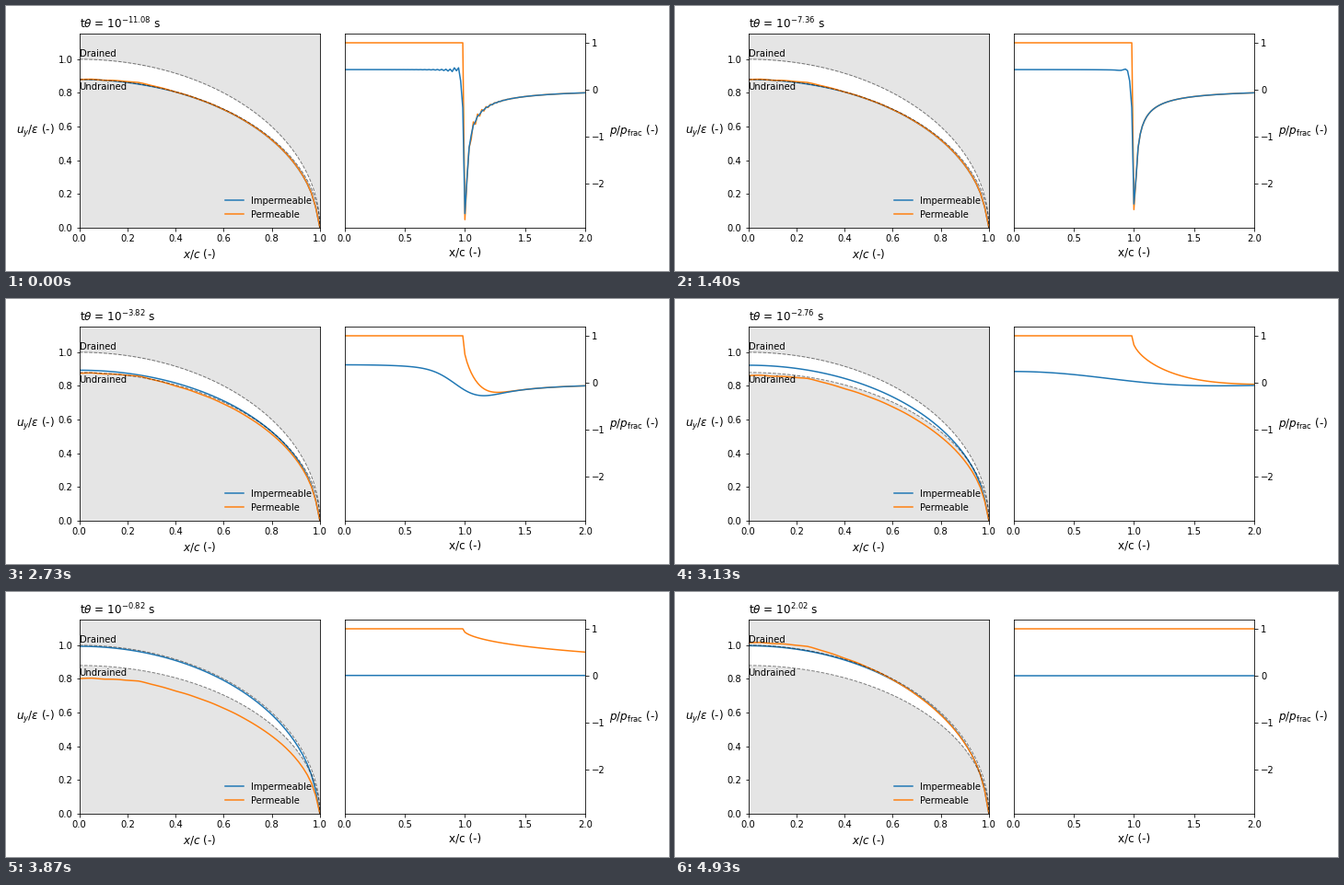
A matplotlib script for the animation above (4990 ms loop, 720 by 288 pixels).

```python
import math

import numpy as np
import matplotlib.pyplot as plt
from matplotlib.animation import FuncAnimation

W, H = 720, 288
FRAMES, LOOP = 75, 4990
E0, DE = -11.08, 0.17697      # log10 of time: start and step
K = 0.43                      # undrained crack pressure
UNDRAINED, DRAINED = 0.88, 0.997
BLUE, ORANGE = "C0", "C1"
NT = 57                       # mesh intervals along the crack

erfc = np.vectorize(math.erfc, otypes=[float])

# Spectral form of the crack pressure: Bessel J1 on a wavenumber grid
dk = 0.1
k = dk * np.arange(1, 9001)
theta = (np.arange(500) + 0.5) * np.pi / 500
j1 = np.cos(theta - np.outer(k, np.sin(theta))).mean(axis=1)

# Nodes along the crack line, counted from the tip
node = np.arange(2 * NT + 1) - NT
xp = (node + NT) / NT
modes = np.cos(np.outer(xp, k)) * j1 * dk
ahead = np.arccosh(1 + np.maximum(xp - 1 + 1 / NT, 0)) ** 2 / 2
phi = (np.arange(80) + 0.5) * np.pi / 160
sign = (-1.0) ** node

# The meshed crack is slightly shorter than the exact ellipse
xs = np.sin(np.linspace(0, np.pi / 2, 160))
ellipse = np.sqrt(np.maximum(1 - xs ** 2, 0))
xu = xp[:NT + 1]
crack = np.sqrt(np.maximum(1 - (xu / 0.992) ** 2, 0))

# Unevenness of the coarse mesh near the crack centre
coarse = np.linspace(0, 1, 21)
bump = np.interp(xu, coarse,
                 0.008 * np.exp(-((coarse - 0.25) / 0.08) ** 2)
                 - 0.002 * np.cos(20 * np.pi * coarse) * np.exp(-2 * coarse))


def sigmoid(z):
    return 1 / (1 + math.exp(-z))


def diffusion_length(e):
    return 0.34 * 10 ** ((e + 2.76) / 2)


def pressures(e):
    """Pressure along the crack line: impermeable, permeable."""
    s = diffusion_length(e)
    base = K * modes @ erfc(k * math.hypot(s, 0.003))
    early = math.exp(-(s / 0.006) ** 2)
    ring = math.exp((E0 - e) / 0.8) * sign * np.exp(-np.abs(node) / 5)

    # Numerical overshoot behind the tip, ringing on both sides
    m = -node
    wake = -1.3 * np.exp(-0.8 * m) * np.cos(0.9 * (m - 1))
    imp = base + np.where(node < 0, early * wake, 0)
    imp += ring * np.select([node < -2, node > 2], [-0.1, 0.04], 0)

    # Front spreading from the pressurised crack
    size = 10 ** (0.45 * (e + 1.8)) * math.exp((10 ** e / 20) ** 2)
    q = erfc(np.outer(ahead / size, 0.5 / np.cos(phi) ** 2)).mean(axis=1)
    per = base + np.where(node > 2, 0.2 * ring, 0) - 0.13 * early * (node == 0)
    return imp, q + (1 - q) * per


def openings(e):
    """Crack opening: impermeable, permeable."""
    u = 0.8 * diffusion_length(e) * k
    kept = erfc(u) * (1 - 2 * u ** 2) + 2 * u / math.sqrt(math.pi) * np.exp(-u ** 2)
    weight = j1 ** 2 / k
    left = weight @ kept / weight.sum()
    imp = DRAINED - (DRAINED - UNDRAINED) * left

    # Squeezed by the pressurised rock first, then opened by it
    squeeze = sigmoid((e + 1.78) / 0.65)
    centre = 0.881 - 0.1 * squeeze + 0.25 * sigmoid((e - 0.86) / 0.42)
    sag = 0.025 * sigmoid((e + 3.5) / 0.5) * np.clip(2 * xu - 0.5, 0, 1)
    return imp * crack, (centre + bump - sag) * crack


fig = plt.figure(figsize=(W / 72, H / 72), dpi=72, facecolor="white")


def panel(left, xmax, ylim, xlabel):
    ax = fig.add_axes([left / W, 47.1 / H, 261.3 / W, 210.5 / H])
    ax.set_xlim(0, xmax)
    ax.set_ylim(*ylim)
    ax.set_xlabel(xlabel, fontsize=12)
    return ax


ax_u = panel(79.6, 1, (0, 1.15), "$x/c$ (-)")
ax_p = panel(367.7, 2, (-2.943, 1.188), "x/c (-)")
ax_u.set_yticks(np.arange(6) * 0.2)
ax_p.set_xticks(np.arange(5) * 0.5)
ax_p.set_yticks(np.arange(-2, 2))
ax_p.yaxis.tick_right()

for x, label in [(32.3, r"$u_y/\epsilon$ (-)"), (682.3, r"$p/p_\mathrm{frac}$ (-)")]:
    fig.text(x / W, 149 / H, label, fontsize=12, ha="center", va="baseline")

grey = dict(color="grey", alpha=0.2, linewidth=0)
ax_u.fill_between(xs, 0, UNDRAINED * ellipse, **grey)
ax_u.fill_between(xs, ellipse, 1.15, **grey)
u_imp, = ax_u.plot([], [], BLUE, label="Impermeable")
u_per, = ax_u.plot([], [], ORANGE, label="Permeable")
for level in (1, UNDRAINED):
    ax_u.plot(xs, level * ellipse, "k--", lw=1, alpha=0.5)
ax_u.text(0, 1.016, "Drained", fontsize=10)
ax_u.text(0, 0.818, "Undrained", fontsize=10)
ax_u.legend(loc="lower right", frameon=False, fontsize=10)
title = ax_u.set_title("", loc="left", fontsize=12)

p_per, = ax_p.plot([], [], ORANGE)
p_imp, = ax_p.plot([], [], BLUE)


def update(i):
    e = E0 + DE * i
    for line, y in zip((u_imp, u_per), openings(e)):
        line.set_data(xu, y)
    for line, y in zip((p_imp, p_per), pressures(e)):
        line.set_data(xp, y)
    title.set_text(rf"t$\theta$ = $10^{{{e:.2f}}}$ s")
    return u_imp, u_per, p_imp, p_per, title


anim = FuncAnimation(fig, update, frames=FRAMES, interval=LOOP / FRAMES,
                     repeat=True, repeat_delay=0, blit=False)
plt.show()
```
